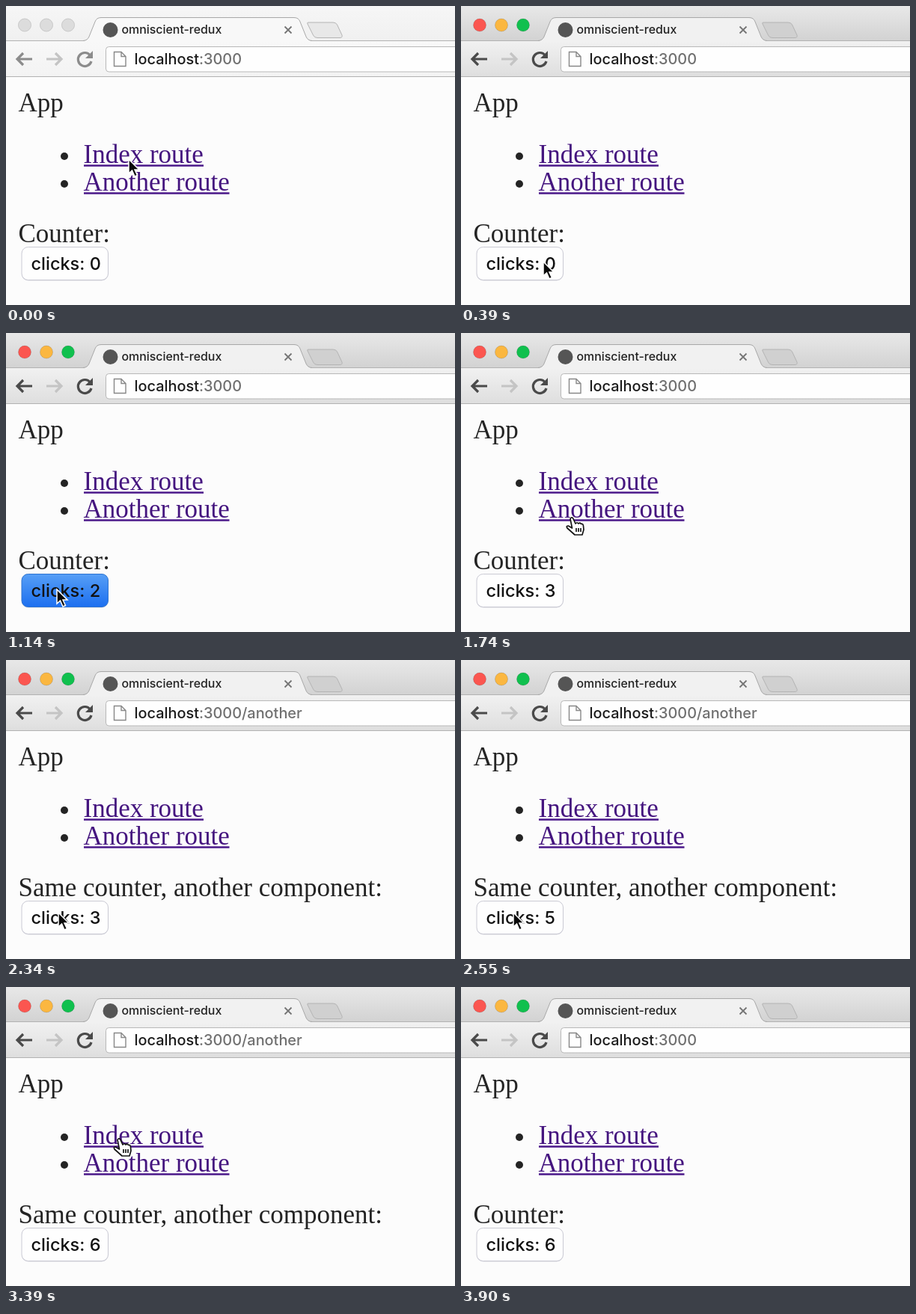
These frames come from a looping animation (600 by 400 pixels, 4.17 s). An HTML page:

```html
<!DOCTYPE html>
<html lang="en">
<head>
<meta charset="utf-8">
<style>
html, body { margin: 0; width: 100%; height: 100%; overflow: hidden; background: #fcfcfc; }
svg { display: block; width: 600px; height: 400px; }
.ui { font-family: Inter, sans-serif; font-weight: 500; }
.page { font: 35px "Liberation Serif", serif; fill: #242424; }
.link { fill: #45157f; }
.line { stroke: #4b188a; stroke-width: 2.4; }
.icon { fill: none; stroke: var(--ink); stroke-width: 3.2; }
</style>
</head>
<body>
<svg id="stage" viewBox="0 0 600 400">
  <defs>
    <linearGradient id="bar" x2="0" y2="1">
      <stop stop-color="var(--barTop)"/><stop offset="1" stop-color="var(--barEnd)"/>
    </linearGradient>
    <linearGradient id="tools" x2="0" y2="1">
      <stop stop-color="var(--toolTop)"/><stop offset="1" stop-color="var(--toolEnd)"/>
    </linearGradient>
    <linearGradient id="blue" x2="0" y2="1">
      <stop stop-color="#579ff6"/><stop offset="1" stop-color="#1c6ff0"/>
    </linearGradient>
  </defs>

  <rect width="600" height="400" fill="#fcfcfc"/>
  <rect width="600" height="47" fill="url(#bar)"/>
  <rect y="47" width="600" height="48" fill="url(#tools)"/>
  <path d="M0 46.5H106M406 46.5H600M0 94.5H600" stroke="#b2b2b2"/>
  <path d="M404 22H437Q441 22 442.500 25L449 39Q450 42.500 446 42.500H416Q412 42.500 410.500 39L403 24Q402 22 404 22Z"
    fill="var(--newTab)" stroke="#b4b4b4"/>
  <path d="M103 47Q109 46 111 41L119 21Q121 16 127 16H385Q391 16 393 21L401 41Q403 46 409 47Z" fill="var(--toolTop)"/>
  <path d="M103 46.500Q109 46 111 41L119 21Q121 15.500 127 15.500H385Q391 15.500 393 21L401 41Q403 46 409 46.500"
    fill="none" stroke="#a8a8a8"/>
  <g id="lights">
    <circle cx="25" cy="25.500" r="8.500"/><circle cx="54" cy="25.500" r="8.500"/><circle cx="83" cy="25.500" r="8.500"/>
  </g>
  <circle cx="139.500" cy="32" r="10" fill="#555"/>
  <text class="ui" x="154.500" y="37" font-size="15.900" fill="#222">omniscient-redux</text>
  <path d="M372.500 27.500L381.500 36.500M381.500 27.500L372.500 36.500" stroke="#757575" stroke-width="1.800"/>

  <path class="icon" d="M35 71H15M23 63L15 71L23 79"/>
  <path class="icon" style="stroke:#c4c4c4" d="M54 71H74M66 63L74 71L66 79"/>
  <path class="icon" d="M112.500 66A9 9 0 1 0 114 74"/>
  <path d="M116 60V70H106Z" fill="var(--ink)"/>
  <rect x="133.500" y="54.500" width="480" height="33.500" rx="4" fill="#fefefe" stroke="#b8b8b8"/>
  <path d="M144.500 61.500H154L160 67.500V80.500H144.500ZM154 61.500V67.500H160" fill="#fefefe" stroke="#888" stroke-width="1.400"/>
  <text class="ui" x="171.500" y="78" font-size="19.900" fill="#1c1c1c">localhost<tspan id="path" fill="#707070"></tspan></text>

  <g class="page">
    <text x="16.500" y="141">App</text>
    <circle cx="78" cy="201" r="5"/><circle cx="78" cy="238" r="5"/>
    <text class="link" x="103.500" y="210">Index route</text>
    <text class="link" x="103.500" y="247">Another route</text>
    <path class="line" d="M104 213.500H264M104 250.500H298.500"/>
    <text id="label" x="16.500" y="316"></text>
  </g>

  <rect x="21" y="323.500" height="44" rx="8.500" fill="#d4d4dc" class="box"/>
  <rect x="21" y="322.500" height="44" rx="8.500" class="box" id="button"/>
  <text id="clicks" class="ui" x="33.500" y="353" font-size="23.500" fill="#111"></text>

  <path id="arrow" d="M0 0V19L4.500 15L8 23L11.500 21.500L8 14H14Z" fill="#0a0a0a" stroke="#fff" stroke-width="1.500"/>
  <path id="hand" d="M-1 1.500Q0-1 2.500 0.500L6 8Q8 5.500 10 8Q12 6 13.500 8.500Q16 7.500 16.500 11L17 16L15 23H5L-5 14Q-7 11-3.500 11L1.500 14ZM7 14V19M10 14V19M13 14V19"
    fill="#fff" stroke="#141414" stroke-width="1.700" stroke-linejoin="round"/>
</svg>
<script>
const LOOP = 4170, STEP = 30;
const $ = id => document.getElementById(id);

// Pointer stops: time, x, y
const stops = [
  [0, 164, 205], [120, 154, 256], [300, 154, 256], [390, 110, 342],
  [780, 110, 342], [1050, 68, 343], [1500, 68, 343], [1710, 147, 247],
  [2100, 147, 247], [2310, 70, 338], [2550, 70, 338], [2730, 70, 335],
  [3000, 70, 335], [3300, 150, 203], [3720, 150, 203], [3900, 525, 92]
];
// Button presses: down, up
const presses = [[540, 630], [930, 1020], [1110, 1230], [2370, 2430], [2490, 2550], [2700, 2730]];
const focusAt = 330;
const skins = {
  active: { barTop: "#e8e8e8", barEnd: "#d2d2d2", toolTop: "#f1f1f1", toolEnd: "#dedede", newTab: "#d0d0d0", ink: "#4a4a4a" },
  idle: { barTop: "#f6f6f6", barEnd: "#f0f0f0", toolTop: "#f8f8f8", toolEnd: "#f3f3f3", newTab: "#e8e8e8", ink: "#8c8c8c" }
};
const lamps = ["#fb5650", "#fbb740", "#10c04e"];

function pointer(t) {
  const i = stops.findIndex(s => s[0] > t);
  const [t0, x0, y0] = stops[i - 1], [t1, x1, y1] = stops[i];
  const p = (t - t0) / (t1 - t0), e = p * p * (3 - 2 * p);
  return [x0 + (x1 - x0) * e, y0 + (y1 - y0) * e];
}

function draw(t) {
  const active = t >= focusAt;
  const skin = active ? skins.active : skins.idle;
  for (const key in skin) $("stage").style.setProperty("--" + key, skin[key]);
  [...$("lights").children].forEach((c, i) => {
    c.setAttribute("fill", active ? lamps[i] : "#dcdcdc");
    c.setAttribute("stroke", active ? "#0002" : "#c8c8c8");
  });

  const another = t >= 1800 && t < 3420;
  $("path").textContent = ":3000" + (another ? "/another" : "");
  $("label").textContent = another ? "Same counter, another component:" : "Counter:";

  const count = presses.filter(p => t >= p[1]).length;
  const down = presses.some(p => t >= p[0] && t < p[1]);
  $("clicks").textContent = "clicks: " + count;
  document.querySelectorAll(".box").forEach(b => b.setAttribute("width", count === 1 ? 113.5 : 115.5));
  $("button").setAttribute("fill", down ? "url(#blue)" : "#fefefe");
  $("button").setAttribute("stroke", down ? "#2f74d0" : "#cacad4");

  const shown = t < 3900;
  const [x, y] = shown ? pointer(t) : [0, 0];
  const overLink = active && x > 103 && (y > 182 && y < 216 && x < 264 || y > 219 && y < 253 && x < 298);
  for (const id of ["arrow", "hand"]) {
    $(id).setAttribute("transform", `translate(${x} ${y})`);
    $(id).style.display = shown && overLink === (id === "hand") ? "" : "none";
  }
}

const start = performance.now();
function tick() {
  const t = (performance.now() - start) % LOOP;
  draw(Math.floor(t / STEP) * STEP);
  requestAnimationFrame(tick);
}
tick();
</script>
</body>
</html>
```
